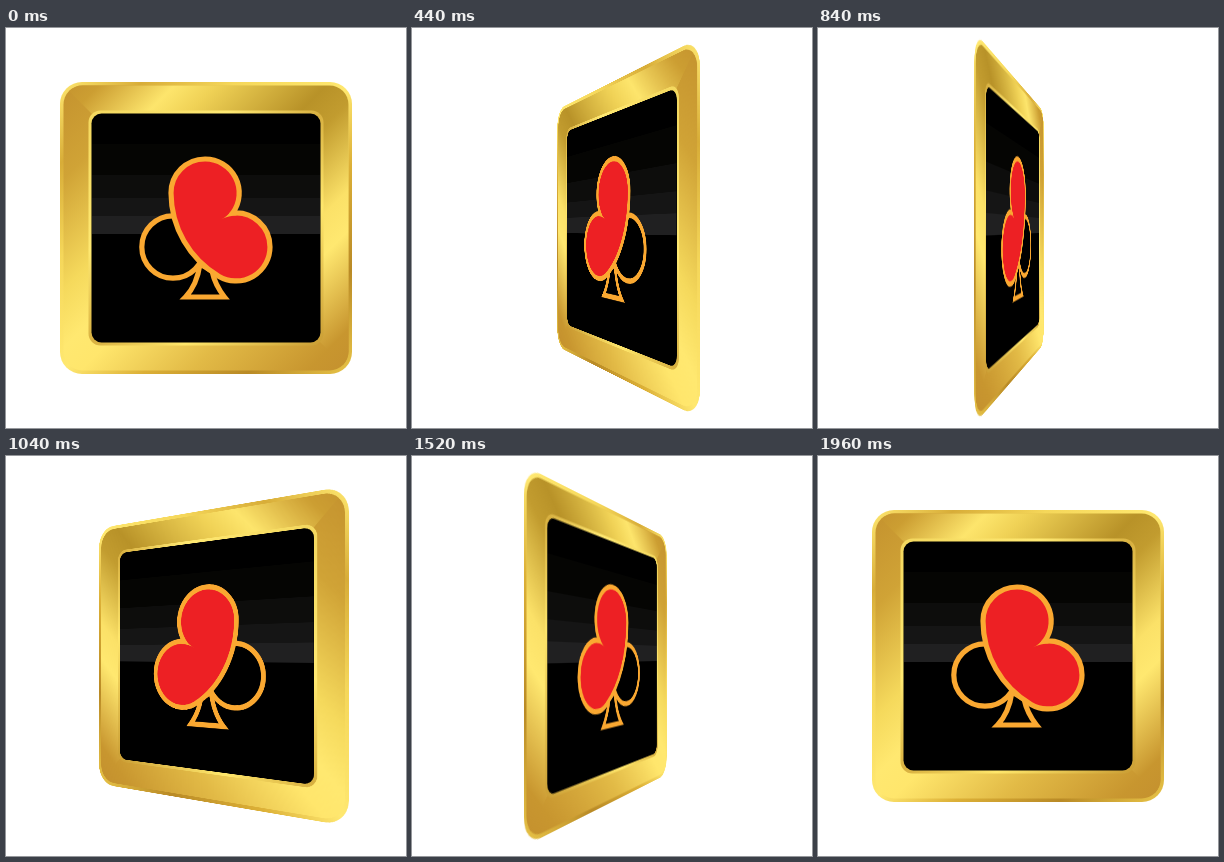
Recreate the animation shown at these times as an HTML page. Size 400 px wide and 400 px high, loop 2000 ms.

```html
<!DOCTYPE html>
<html lang="en">
<head>
<meta charset="utf-8">
<title>Spinning card badge</title>
<style>
  html, body { margin: 0; width: 100%; height: 100%; overflow: hidden; background: #fff; }
  #stage { position: relative; width: 100%; height: 100%; overflow: clip; contain: strict; }
  #badge { display: block; position: absolute; left: 0; top: 0; width: 400px; height: 400px; transform-origin: 200px 200px; }
</style>
</head>
<body>
<div id="stage">
<svg id="badge" viewBox="0 0 400 400">
  <defs>
    <linearGradient id="rim" gradientUnits="userSpaceOnUse" x1="54" y1="54" x2="346" y2="346">
      <stop offset="0" stop-color="#ffe870"/>
      <stop offset=".14" stop-color="#d8ad38"/>
      <stop offset=".3" stop-color="#f5d75a"/>
      <stop offset=".5" stop-color="#ffe870"/>
      <stop offset=".64" stop-color="#dcb037"/>
      <stop offset=".82" stop-color="#b98a26"/>
      <stop offset="1" stop-color="#e9c548"/>
    </linearGradient>
    <!-- top and right bars -->
    <linearGradient id="upper" gradientUnits="userSpaceOnUse" x1="55" y1="55" x2="345" y2="345">
      <stop offset="0" stop-color="#c4922e"/>
      <stop offset=".07" stop-color="#cc9e32"/>
      <stop offset=".2" stop-color="#fde56c"/>
      <stop offset=".27" stop-color="#f0d256"/>
      <stop offset=".46" stop-color="#b89228"/>
      <stop offset=".53" stop-color="#c29c2f"/>
      <stop offset=".68" stop-color="#fbe168"/>
      <stop offset=".75" stop-color="#ffe870"/>
      <stop offset=".92" stop-color="#c8962f"/>
      <stop offset="1" stop-color="#c4902e"/>
    </linearGradient>
    <!-- left and bottom bars -->
    <linearGradient id="lower" gradientUnits="userSpaceOnUse" x1="55" y1="55" x2="345" y2="345">
      <stop offset="0" stop-color="#c4922e"/>
      <stop offset=".17" stop-color="#d0a336"/>
      <stop offset=".36" stop-color="#f5d95c"/>
      <stop offset=".46" stop-color="#ffe870"/>
      <stop offset=".53" stop-color="#ffe66c"/>
      <stop offset=".72" stop-color="#e2ba46"/>
      <stop offset=".92" stop-color="#c8962f"/>
      <stop offset="1" stop-color="#c4902e"/>
    </linearGradient>
    <linearGradient id="lip" gradientUnits="userSpaceOnUse" x1="82" y1="82" x2="318" y2="318">
      <stop offset="0" stop-color="#f3d75e"/>
      <stop offset=".3" stop-color="#ffe972"/>
      <stop offset=".5" stop-color="#d8b040"/>
      <stop offset=".7" stop-color="#ffe76c"/>
      <stop offset="1" stop-color="#c99c33"/>
    </linearGradient>
    <clipPath id="corner"><path d="M54 54H346V346Z"/></clipPath>
  </defs>

  <rect x="54" y="54" width="292" height="292" rx="22" fill="url(#rim)"/>
  <rect x="57.5" y="57.5" width="285" height="285" rx="19" fill="url(#lower)"/>
  <rect x="57.5" y="57.5" width="285" height="285" rx="19" fill="url(#upper)" clip-path="url(#corner)"/>
  <rect x="82.5" y="82.5" width="235" height="235" rx="12" fill="url(#lip)"/>
  <rect x="85.5" y="85.5" width="229" height="229" rx="10"/>

  <!-- stepped sheen -->
  <path d="M86 116H314V147H86Z" fill="#050503"/>
  <path d="M86 147H314V170H86Z" fill="#0d0d0c"/>
  <path d="M86 170H314V188H86Z" fill="#151515"/>
  <path d="M86 188H314V206H86Z" fill="#202021"/>

  <g stroke="#faa831" stroke-width="5.2">
    <circle cx="167" cy="219" r="31.2"/>
    <path d="M194 236Q191 257 179.500 269H218.500Q209 257 206 243Z"/>
    <path fill="#ed2024" d="M226.700 185A34 34 0 0 0 199 131A34 34 0 0 0 165 165A97 97 0 0 0 213 248.400A34 34 0 0 0 264 219A34 34 0 0 0 226.700 185Z"/>
  </g>
  <path d="M224.500 183.500Q221.500 188.500 214.500 191.500Q223 187.500 231 187.500Z" fill="#faa831"/>
</svg>
</div>
<script>
  const FRAMES = 50, STEP_MS = 40, TURNS = 3;
  // The last frame closes the third full turn, so one more step would overshoot it.
  const sweep = -360 * TURNS * FRAMES / (FRAMES - 1);
  const pose = deg => ({ transform: `perspective(555px) rotateY(${deg}deg)` });

  document.getElementById('badge').animate([pose(0), pose(sweep)], {
    duration: FRAMES * STEP_MS,
    easing: `steps(${FRAMES}, end)`,
    iterations: Infinity
  });
</script>
</body>
</html>
```
